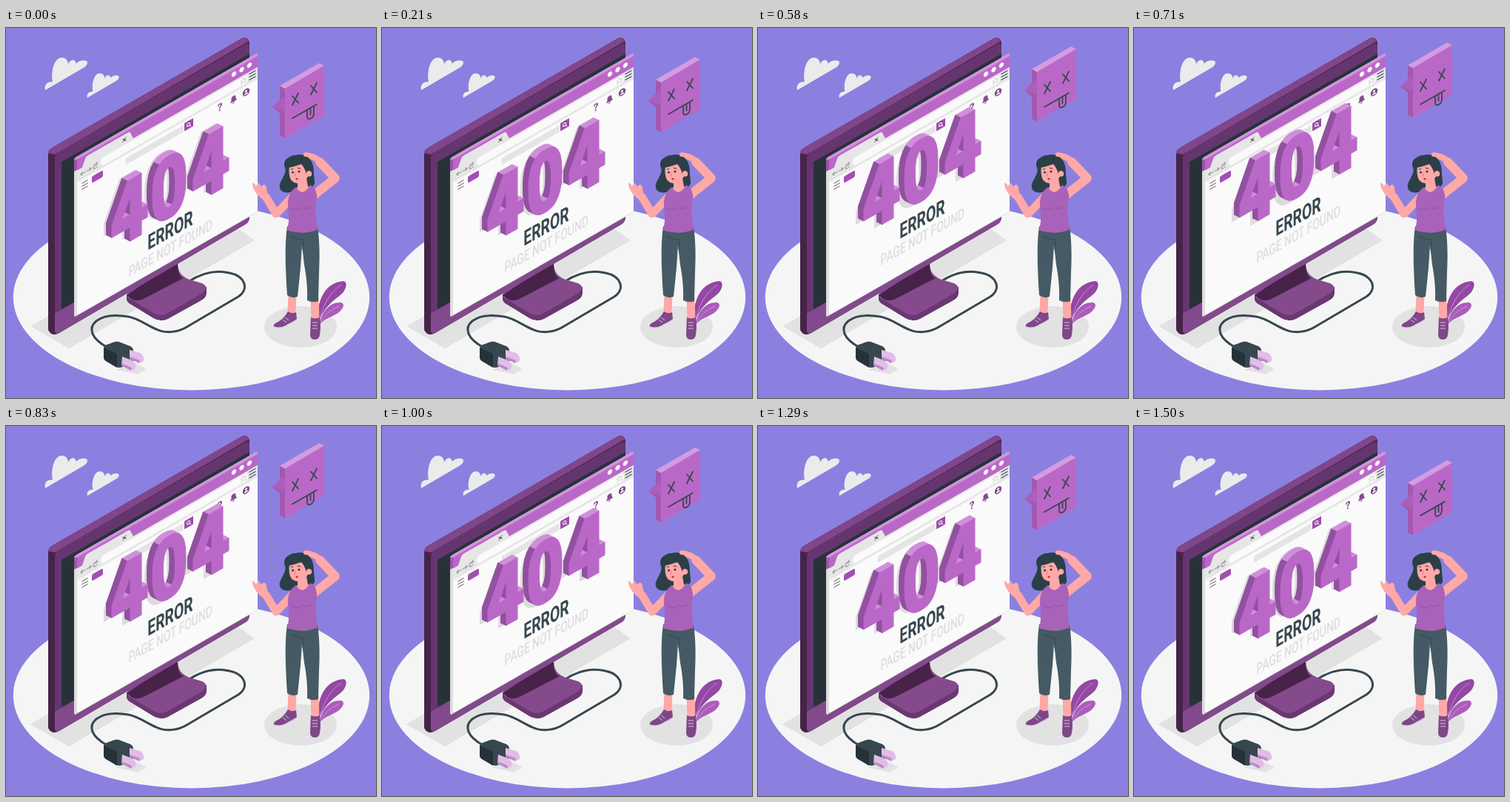
Recreate the animation shown at these times as an HTML page. Size 500x500 px, loop 1540 ms.

```html
<!DOCTYPE html>
<html lang="en">
<head>
<meta charset="utf-8">
<title>404</title>
<style>
  html, body { margin: 0; width: 100%; height: 100%; overflow: hidden; background: #8b80e0; }
  svg { display: block; width: 100vw; height: 100vh; }
  text { font-family: Roboto, sans-serif; }
  .line { fill: none; stroke: #37474f; stroke-linecap: round; stroke-linejoin: round; }
  .skin { fill: #ffa8a7; }
  .limb { fill: none; stroke: #ffa8a7; stroke-linecap: round; stroke-linejoin: round; }
  .hair { fill: #2b3f47; }
  .lilac { fill: #ba68c8; }
  .plum { fill: #7f4789; }
  .dark { fill: #472349; }
</style>
</head>
<body>
<svg viewBox="0 0 500 500">
  <rect width="500" height="500" fill="#8b80e0"/>
  <ellipse cx="250.500" cy="364" rx="240.700" ry="125.500" fill="#f5f5f5"/>

  <!-- clouds -->
  <path id="cloud" fill="#ebebeb" d="M53 84C51 77 56 72 63 73C60 57 66 40 75 40C81 40 84 44 84 49C87 42 93 41 95 48C99 43 110 42 110 47Q110 50 106 53Z"/>
  <use href="#cloud" transform="translate(70.2 31.3) scale(.75)"/>

  <!-- floor shadows -->
  <g fill="#e2e2e2">
    <path d="M33 403L290 255L336 287L85 433Z"/>
    <ellipse cx="398" cy="404" rx="49" ry="28"/>
    <path d="M150 462L178 468L189 461L170 450Z"/>
  </g>

  <!-- cord -->
  <path class="line" stroke-width="3" d="M246 343C266 330 286 327 302 331C322 335 330 352 314 363L246 403C232 412 215 413 203 407C191 402 178 392 165 390C148 387 132 388 122 396C110 406 116 420 136 431"/>

  <!-- stand -->
  <path fill="#693771" d="M163 360V367Q164 371 168 373L199 392Q209 398 219 393L264 368Q271 364 271 358V350Z"/>
  <path fill="#854a8c" d="M166 357L232 318C232 331 239 336 248 340L265 345Q275 350 266 358L219 385Q209 391 199 385L167 366Q160 361 166 357Z"/>
  <path class="dark" d="M163 361L181 349L232 316C232 330 234 336 240 338L186 366Q178 370 171 367Z"/>

  <!-- plug -->
  <path fill="#37474f" d="M132 433Q132 430 136 428L147 424Q151 423 155 425L168 430Q172 432 172 436V448Q172 451 168 453L157 458Q153 460 149 458L135 450Q132 448 132 444Z"/>
  <path fill="#263238" d="M132 432L150 440V459L135 450Q132 448 132 444Z"/>
  <path d="M157 444L170 449Q178 454 174 461L169 463L156 456ZM167 435L181 439Q189 445 185 451L180 453L167 447Z" fill="#e1bee7"/>
  <path d="M169 463L156 456V453L170 459ZM180 453L167 447V444L181 449Z" fill="#ba8cc6"/>

  <!-- monitor -->
  <path class="dark" d="M57 171Q57 165 62 162L317 15Q327 10 329 20V255Q329 262 324 265L72 412Q62 418 57 408Z"/>
  <path fill="#804689" d="M57 169Q57 165 62 162L317 15Q325 11 328 18L66 171Z"/>
  <path fill="#653570" d="M66 177Q66 171 71 168L322 23Q329 18 329 25V255L66 405Z"/>
  <path fill="#824a8c" d="M66 386L329 236V255Q329 262 324 265L72 412Q66 415 66 408Z"/>
  <path fill="#263238" d="M75 181L329 35V236L75 380Z"/>

  <!-- browser window -->
  <g transform="matrix(1 -.573 0 1 92 176)">
    <rect width="248" height="215" rx="3" fill="#dedede"/>
    <rect x="4" y="4" width="244" height="210" rx="2" fill="#fafafa"/>
    <path fill="#9a56a8" d="M0 3Q0 0 3 0H6V18H0Z"/>
    <path class="lilac" d="M4 3H248V19H4Z"/>
    <path fill="#d391de" d="M0 2Q0 0 3 0H246Q248 0 248 4H4Z"/>
    <path fill="#e6e6e6" d="M4 19H11L15 9Q16 7 19 7H72Q75 7 76 9L80 19H248V35H4Z"/>
    <rect x="36" y="21" width="199" height="11" rx="5" fill="#fafafa"/>
    <g fill="#fff"><circle cx="216" cy="10" r="3.2"/><circle cx="226.5" cy="10" r="3.2"/><circle cx="237" cy="10" r="3.2"/></g>
    <path class="line" stroke-width="1" d="M66 12l4 4m0-4l-4 4"/>
    <path class="line" style="stroke:#8a8a8a" stroke-width="1" d="M15 27H9l2-2m-2 2l2 2M17 27h6l-2-2m2 2l-2 2M31 25a3 3 0 1 0 0 4m0-6v3h-3"/>
    <path class="line" stroke-width="1.3" d="M237 22h8m-8 4h8m-8 4h8"/>
    <path d="M229 22l1 3 3 0-2 2 1 3-3-2-3 2 1-3-2-2h3z" fill="none" stroke="#ccc" stroke-width=".7"/>
    <path class="line" style="stroke:#888" stroke-width="1.5" d="M11 40h7m-7 4h7m-7 4h7"/>
    <rect x="24" y="38.500" width="15" height="9" rx="2" fill="#a24fb2"/>
    <rect x="70" y="40" width="78" height="9" rx="1" fill="#e4e4e4"/>
    <rect x="149" y="38" width="12" height="11" rx="1" fill="#9a50a8"/>
    <circle cx="154.500" cy="43" r="2" fill="none" stroke="#fff"/>
    <path d="M156 45l2 2" stroke="#fff"/>
    <g fill="#85498f">
      <text x="197" y="49" font-size="14" font-weight="700" text-anchor="middle">?</text>
      <path d="M211 47l1.500-3v-2q0-3 3-3t3 3v2l1.500 3zM213.500 48h4q-2 3-4 0z"/>
      <circle cx="232.500" cy="44" r="4.700"/>
    </g>
    <circle cx="232.500" cy="42.500" r="1.500" fill="#fff"/>
    <path d="M229.500 47q3-5 6 0z" fill="#fff"/>

    <g class="near">
      <g id="shade" fill="#dcdcdc" stroke="#dcdcdc" stroke-width="2" stroke-linejoin="round" transform="translate(-10 -9)"></g>
      <g transform="scale(.68 1)">
        <text x="146" y="181.500" font-size="28.500" font-weight="700" fill="#37474f">ERROR</text>
        <text x="108" y="203" font-size="20.500" font-weight="500" fill="#dedede">PAGE NOT FOUND</text>
      </g>
    </g>
    <g class="far" id="digits" stroke-linejoin="round"></g>
  </g>

  <!-- speech bubble -->
  <g class="far">
    <path fill="#a258b1" d="M370 78L377 82V149L370 145V115L360 107L370 97Z"/>
    <path class="lilac" d="M370 96L377 93V113L360 107Z" opacity=".4"/>
    <path fill="#d59be0" d="M370 78L423 47.500L430 51L377 82Z"/>
    <path class="lilac" d="M377 82L430 51V118L377 149Z"/>
  </g>
  <g class="near">
    <path class="line" stroke-width="1.800" d="M387 92l8 9m0-13l-8 16M412 78l8 9m0-13l-8 16M387 122L420 103M407 111v9c0 6 9 2 9-5V106M411.500 109v8"/>
  </g>

  <!-- plant -->
  <g fill="#9447a3">
    <path d="M422 399C419 370 430 344 456 342C462 343 460 352 455 358C446 367 431 373 422 399Z"/>
    <path fill="#ab5cba" d="M423 402C427 383 437 370 453 371C459 373 455 380 449 385C440 391 430 392 423 402Z"/>
    <path d="M423 398C428 374 438 357 453 347M424 400C430 388 438 381 450 376" fill="none" stroke="#d59be0" stroke-width=".8"/>
  </g>

  <!-- woman -->
  <path class="limb" stroke-width="11" style="stroke-linecap:butt" d="M387 358L386 386M417 364L418 396"/>
  <path class="plum" d="M381 383Q387 387 392 384L393 393Q390 397 382 400Q372 407 363 404Q360 402 364 399Q375 394 381 383Z"/>
  <path class="plum" d="M412 391Q418 394 424 391Q426 404 424 415Q423 421 417 421Q411 421 411 414Z"/>
  <path d="M363 404Q372 407 382 400L393 394M377 391l5 4m-8-1l5 4M414 398h7m-7 4h7m-7 4h7" fill="none" stroke="#e1bee7"/>
  <path fill="#455a64" d="M380 268L421 268C424 288 424 310 423 330L422 369Q415 372 407 368C408 350 405 330 403 320L400 294L398 324L394 363Q386 366 380 361C378 330 376 295 380 268Z"/>
  <path d="M385 281Q396 287 402 286L401 300" fill="none" stroke="#37474f"/>
  <path class="hair" d="M386 174C378 175 374 181 377 189C380 199 368 207 370 216C372 224 384 224 391 219L412 215Q418 213 417 207L415 186Z"/>
  <path class="limb" stroke-width="11" d="M388 227C378 238 372 244 365 251L351 228"/>
  <path class="skin" d="M346 231C338 225 333 217 333 210Q335 208 338 214L340 210Q342 208 344 214L348 212Q351 211 352 216L354 227Z"/>
  <path class="limb" stroke-width="12" d="M416 226L445 203L424 181"/>
  <path class="limb" stroke-width="8" d="M425 181Q417 173 408 173"/>
  <path class="skin" d="M394 203H406L408 214L419 219L412 232H391L386 222L394 215Z"/>
  <path fill="#a962b9" d="M387 219L392 215Q401 230 411 212L417 216Q422 226 419 238Q417 255 422 272Q402 281 380 273Q384 256 381 241Q380 227 387 219Z"/>
  <path d="M385 243q7 5 13 0m3 0q8 3 14-4" fill="none" stroke="#9650a5"/>
  <path class="skin" d="M383 186C384 179 404 178 407 186C411 190 411 199 407 202C404 210 397 211 390 209C382 206 382 195 383 186Z"/>
  <path class="hair" d="M382 189C376 180 381 172 391 172C403 168 414 176 415 187L416 194Q411 190 408 194L406 198Q404 189 399 184Q390 187 382 189Z"/>
  <path class="limb" stroke-width="6" d="M405 171Q412 171 420 177"/>
  <circle cx="409.500" cy="197" r="3.800" class="skin"/>
  <g class="hair"><circle cx="387.500" cy="195" r="1.500"/><circle cx="396" cy="194" r="1.500"/><ellipse cx="393" cy="204" rx="1.700" ry="1.300" fill="#a33b45"/></g>
  <path class="line" stroke-width="1" d="M385 191l3-1m6-1l4 1"/>
  <path d="M391 195l-1 4 2 1" fill="none" stroke="#e5807f"/>
</svg>
<script>
  const LOOP = 1540, PEAK = 720;
  const DEPTH = [-7.5, -8];
  const FRONT = '#ba68c8', SIDE = '#9250a0', TOP = '#d08edb';

  const oval = (rx, ry, dir) => Array.from({ length: 48 }, (_, i) => {
    const a = dir * i * Math.PI / 24, c = Math.cos(a), s = Math.sin(a);
    const bulge = v => Math.sign(v) * Math.abs(v) ** .8;
    return [23 + rx * bulge(c), 40 + ry * bulge(s)];
  });
  const four = [
    [[21, 0], [40, 0], [40, 47], [48, 47], [48, 64], [40, 64], [40, 83], [25, 83], [25, 64], [0, 64], [0, 48]],
    [[25, 22], [14, 47], [25, 47]]
  ];
  const zero = [oval(22.5, 42.5, 1), oval(8, 27, -1)];

  const outline = points => 'M' + points.map(p => p.map(n => n.toFixed(1)).join(' ')).join('L') + 'Z';
  const path = (d, color) => `<path d="${d}" fill="${color}" stroke="${color}" fill-rule="evenodd"/>`;

  // Side walls facing the viewer, shaded by how far they point up.
  function walls(ring) {
    return ring.map((p, i) => {
      const q = ring[(i + 1) % ring.length];
      const dx = q[0] - p[0], dy = q[1] - p[1];
      if (dy * DEPTH[0] - dx * DEPTH[1] <= 0) return '';
      const back = ([x, y]) => [x + DEPTH[0], y + DEPTH[1]];
      return path(outline([p, q, back(q), back(p)]), dx / Math.hypot(dx, dy) > .7 ? TOP : SIDE);
    }).join('');
  }

  const digits = document.getElementById('digits'), shade = document.getElementById('shade');
  for (const [glyph, x] of [[four, 161], [zero, 105.5], [four, 51]]) {
    const face = glyph.map(outline).join('');
    const place = content => `<g transform="translate(${x} 72.500)">${content}</g>`;
    digits.innerHTML += place(glyph.map(walls).join('') + path(face, FRONT));
    shade.innerHTML += place(`<path d="${face}" fill-rule="evenodd"/>`);
  }

  const lift = (name, height) => document.querySelectorAll(name)
    .forEach(el => el.setAttribute('transform', `translate(0 ${-height})`));

  function draw(now) {
    const t = now % LOOP;
    const rise = t < PEAK ? t / PEAK : (LOOP - t) / (LOOP - PEAK);
    lift('.far', 28 * rise);
    lift('.near', 19 * rise);
    requestAnimationFrame(draw);
  }
  draw(performance.now());
</script>
</body>
</html>
```
